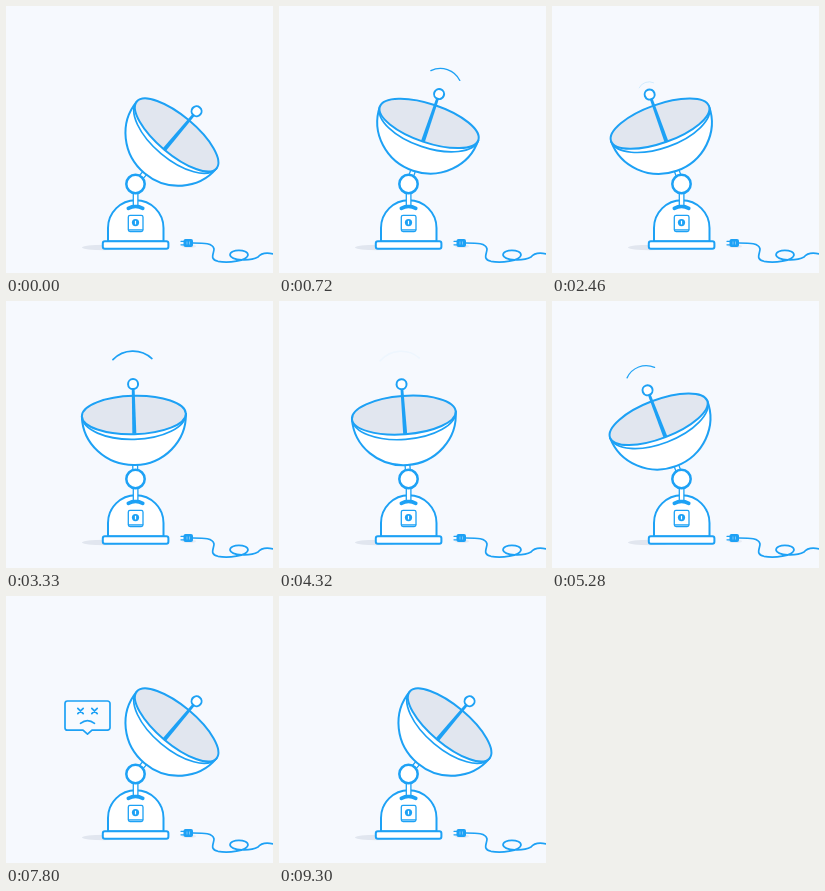
Recreate the animation shown at these times as an HTML page. Size 267 px wide and 267 px high, loop 9420 ms.

```html
<!DOCTYPE html>
<html lang="en">
<head>
<meta charset="utf-8">
<title>Satellite dish</title>
<style>
html, body { margin: 0; width: 100%; height: 100%; overflow: hidden; background: #f6f9fe; }
svg { display: block; width: 100%; height: 100%; }
.line { fill: none; stroke: #1da1f5; stroke-width: 2; stroke-linecap: round; stroke-linejoin: round; }
.white { fill: #fff; }
.pale { fill: #f8fafe; }
.grey { fill: #e1e6ef; }
.blue { fill: #1da1f5; }
.thin { stroke-width: 1.3; }
.mid { stroke-width: 1.7; }
</style>
</head>
<body>
<svg viewBox="0 0 267 267">
  <ellipse class="grey" cx="98" cy="241.5" rx="22" ry="2.8"/>
  <ellipse class="grey" cx="183" cy="240.3" rx="7" ry="1.8" opacity=".7"/>

  <!-- cord and plug -->
  <path class="line mid" d="M187 237C198 237 207 237 208 243C208 248 203 253 212 255.3C222 257.3 241 255 242 249C242 243 224 242.5 224 249C225 255 245 255 252 251C255 247 260 246 268 248"/>
  <path class="line thin" d="M175 235.3H179M175 238.8H179"/>
  <rect class="blue" x="177.5" y="233" width="9.5" height="8" rx="2"/>
  <path d="M181 235.5V238.5M183.5 235.5V238.5" stroke="#8fd0fa" stroke-width=".8"/>

  <!-- base -->
  <path class="line white" d="M102 235.5V222a27.75 27.75 0 0 1 55.5 0V235.5Z"/>
  <rect class="line white" x="96.8" y="235.2" width="65.6" height="7.6" rx="2"/>
  <rect class="line white thin" x="122.3" y="209.3" width="14.7" height="16.2" rx="1.8"/>
  <path class="line thin" d="M122.8 223.8H136.6"/>
  <circle class="blue" cx="129.5" cy="216.6" r="3.6"/>
  <path d="M129.5 214.8V218.4" stroke="#fff" stroke-width="1.2"/>
  <path class="line" d="M122.3 202.4Q129.5 198.4 136.8 202.4" stroke-width="4" style="stroke-width:3.6"/>
  <path class="line white thin" d="M127.3 186V199.5H131.9V186"/>

  <g id="dish">
    <path class="line white thin" d="M-2.4-7V-15H2.4V-7"/>
    <path class="white" d="M-52-64a52 50 0 0 0 104 0Z"/>
    <path class="grey" d="M50.5-54Q45-32 20-17.5Q43-23 50.5-54Z"/>
    <path class="line" d="M-52-64a52 50 0 0 0 104 0"/>
    <path class="line white mid" d="M-52-64a52 24.3 0 0 0 104 0"/>
    <ellipse class="line grey" cx="0" cy="-64" rx="52" ry="19.2" style="fill:#e1e6ef"/>
    <path class="blue" d="M-1.4-91H1.4L2-45.2H-2Z"/>
    <circle class="line white" cx="0" cy="-95" r="5"/>
    <path id="wave" class="line mid" d="M-19.5-25A27.8 27.8 0 0 1 19.5-25"/>
  </g>
  <circle class="line white" cx="129.5" cy="178" r="9.2" style="stroke-width:2.5"/>

  <g id="bubble">
    <path class="line pale mid" d="M61.5 105H101.5a2.5 2.5 0 0 1 2.5 2.5V131.7a2.5 2.5 0 0 1-2.5 2.5H86L81.5 138.2L77 134.2H61.5a2.5 2.5 0 0 1-2.5-2.5V107.5a2.5 2.5 0 0 1 2.5-2.5Z"/>
    <path class="line mid" d="M71.8 112.3l5.4 5.4m0-5.4l-5.4 5.4M85.8 112.3l5.4 5.4m0-5.4l-5.4 5.4M74.5 127.3Q81.5 121.8 88.5 127.3"/>
  </g>
</svg>
<script>
const LOOP = 9420, STEP = 30, SCAN = 6900, PULSE = SCAN / 3;
const [dish, wave, bubble] = ['dish', 'wave', 'bubble'].map(id => document.getElementById(id));

// dish tilt: [ms, degrees]
const tilt = [[0, 40], [960, 11.8], [1410, -0.9], [1920, -14], [2250, -21], [2460, -19.6],
  [2880, -11], [3700, 2.7], [4320, -4.2], [4800, -14], [5320, -21], [5760, -10.8],
  [6180, 8], [6720, 32], [SCAN, 40]];

const ramp = (t, a, b) => Math.min(1, Math.max(0, (t - a) / (b - a)));

const slope = i => (tilt[i + 1][1] - tilt[i][1]) / (tilt[i + 1][0] - tilt[i][0]);

// flat at turning points, smooth elsewhere
function tangent(i) {
  if (i === 0) return slope(0);
  if (i === tilt.length - 1) return slope(i - 1);
  const a = slope(i - 1), b = slope(i);
  return a * b <= 0 ? 0 : 2 * a * b / (a + b);
}

function angle(t) {
  if (t >= SCAN) return 40;
  const i = tilt.findIndex(k => k[0] > t) - 1;
  const [t0, a0] = tilt[i], [t1, a1] = tilt[i + 1];
  const h = t1 - t0, u = (t - t0) / h, v = 1 - u;
  return v * v * (1 + 2 * u) * a0 + u * v * v * h * tangent(i)
    + u * u * (3 - 2 * u) * a1 - u * u * v * h * tangent(i + 1);
}

function draw(time) {
  const t = Math.floor(time % LOOP / STEP) * STEP;
  dish.setAttribute('transform', `translate(129.5 178) rotate(${angle(t)})`);

  const p = t % PULSE;
  const size = 0.28 + 0.72 * ramp(p, 0, 1030);
  wave.setAttribute('transform', `translate(0 -95) scale(${size})`);
  wave.setAttribute('opacity', t < SCAN ? ramp(p, 0, 700) * (1 - ramp(p, 1150, 2050)) : 0);

  const rise = ramp(t, 7290, 7800);
  bubble.setAttribute('transform', `translate(0 ${12 * (1 - rise) ** 2})`);
  bubble.setAttribute('opacity', rise * (1 - ramp(t, 9000, 9300)));
}

const start = performance.now();
function tick() {
  draw(performance.now() - start);
  requestAnimationFrame(tick);
}
tick();
</script>
</body>
</html>
```
